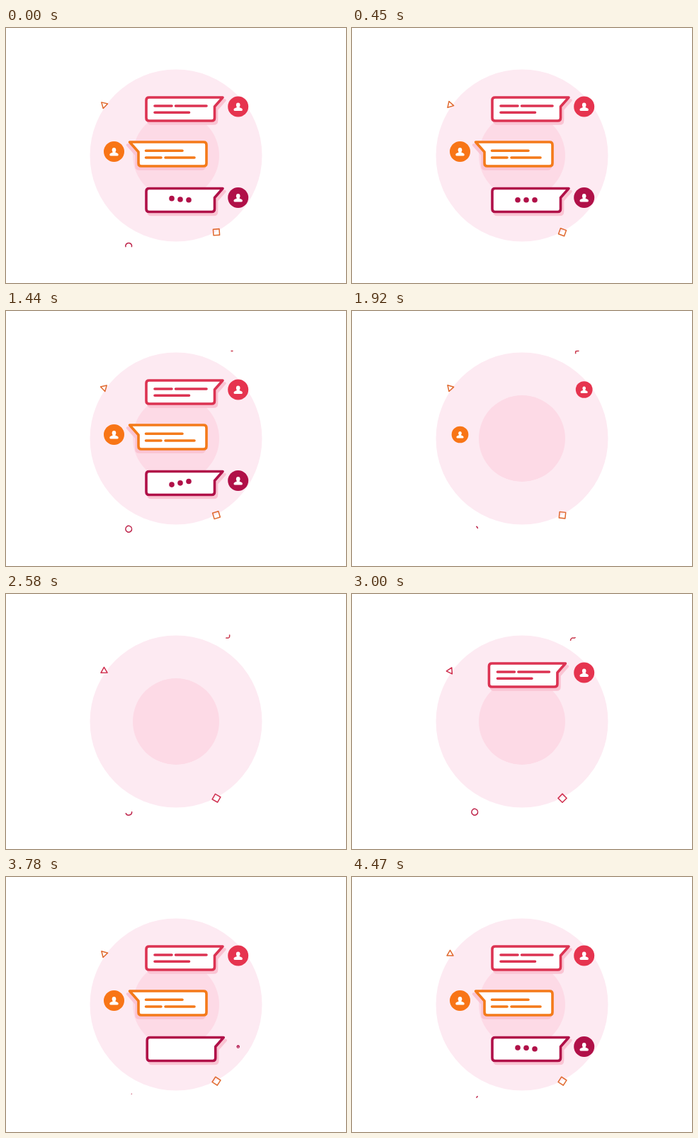
Animation of 480x360 px, one loop 4.5 s. Source, as an HTML page:

```html
<!DOCTYPE html>
<html lang="en">
<head>
<meta charset="utf-8">
<title>Chat bubbles</title>
<style>
  html, body { margin: 0; width: 100%; height: 100%; overflow: hidden; background: #fff; }
  svg { display: block; width: 100vw; height: 100vh; }
  .line { fill: none; stroke: currentColor; stroke-width: 3.6; stroke-linecap: round; stroke-linejoin: round; }
  .box { fill: #fff; }
  .shade { fill: #fac4d3; stroke: #fac4d3; }
  .bit { fill: none; stroke-width: 1.5; stroke-linejoin: round; }
</style>
</head>
<body>
<svg viewBox="0 0 480 360">
  <defs>
    <path id="right" d="M202 98H306L294.5 111V127q0 4-4 4H202q-4 0-4-4V102q0-4 4-4Z"/>
    <path id="left" d="M174.5 161H279q4 0 4 4V191q0 4-4 4H191q-4 0-4-4V175Z"/>
    <g id="person">
      <circle r="14.5" fill="currentColor"/>
      <ellipse cy="-2.3" rx="2.8" ry="3.2" fill="#fff"/>
      <path fill="#fff" d="M-6.2 4.6C-6.2 1.5-1.6 2-1.6 0H1.6C1.6 2 6.2 1.5 6.2 4.6Q6.2 6 5 6H-5Q-6.2 6-6.2 4.6Z"/>
    </g>
  </defs>

  <circle cx="240" cy="180" r="121.5" fill="#fdeaf2"/>
  <circle cx="240" cy="180" r="61" fill="#fddae6"/>

  <path id="tri" class="bit" d="M5.2 0L-2.6 4.5V-4.5Z"/>
  <rect id="square" class="bit" x="-4.3" y="-4.3" width="8.6" height="8.6"/>
  <path id="ring" class="bit" stroke="#bd2148"/>
  <path id="curl" class="bit" stroke="#c8354a" pathLength="100"
    d="M320.5 56.5C314 56 316 57.5 315.6 60C315 64 312 61 310 62.5Q308.5 63.6 308.5 66"/>

  <g color="#dc3352">
    <g class="bubble">
      <use href="#right" class="line shade" x="3" y="4"/>
      <use href="#right" class="line box"/>
      <path class="line" d="M210 110H234M239.5 110H283M210 119.3H258.5"/>
    </g>
    <use class="avatar" href="#person" color="#e6344f"/>
  </g>
  <g color="#f47a1a">
    <g class="bubble">
      <use href="#left" class="line shade" x="-3" y="4"/>
      <use href="#left" class="line box"/>
      <path class="line" d="M197.5 173.2H249M197.5 183H219M225 183H266"/>
    </g>
    <use class="avatar" href="#person" color="#f87516"/>
  </g>
  <g color="#b01048">
    <g class="bubble">
      <use href="#right" class="line shade" x="3" y="132.5"/>
      <use href="#right" class="line box" y="128.5"/>
      <g id="dots" fill="currentColor">
        <circle cx="234" r="3.8"/><circle cx="246" r="3.8"/><circle cx="258" r="3.8"/>
      </g>
    </g>
    <use class="avatar" href="#person"/>
  </g>
</svg>
<script>
const LOOP = 4500;
const $ = id => document.getElementById(id);
const bubbles = document.querySelectorAll('.bubble');
const avatars = document.querySelectorAll('.avatar');
const dots = $('dots');

// Slide-in start, direction, exit times and avatar position of each message.
const messages = [
  { enter: 2698, dir: 1, fade: 1740, shrink: 1840, x: 327.7, y: 111 },
  { enter: 3238, dir: -1, fade: 1740, shrink: 1840, x: 152.5, y: 174.5 },
  { enter: 3633, dir: 1, fade: 1640, shrink: 1700, x: 327.7, y: 239.5 }
];

// Rows of [time, value, value...]
const spin = [[0, -4], [930, 45], [1440, 73], [1920, 96], [3000, 135], [3780, 123], [4500, 123]];
const ringTrim = [[0, 160, 380], [450, 380, 380], [451, 30, 30], [930, 30, 150], [1440, 30, 389],
  [1441, -10, 349], [1920, 300, 350], [2050, 350, 350], [2200, -10, -10], [3000, -10, 349],
  [3780, 333, 345], [3850, 345, 345], [4250, 20, 20], [4500, 20, 65]];
const curlTrim = [[0, 0, 0], [1390, 0, 0], [1440, 0, 15], [1920, 0, 43], [3000, 46, 100],
  [3250, 100, 100], [4500, 100, 100]];

const part = (t, from, length) => Math.min(1, Math.max(0, (t - from) / length));
const outCubic = p => 1 - (1 - p) ** 3;
const outBack = p => 1 + 2.70158 * (p - 1) ** 3 + 1.70158 * (p - 1) ** 2;

function at(rows, t) {
  const i = Math.max(1, rows.findIndex(r => r[0] > t));
  const [a, b] = [rows[i - 1], rows[i]];
  const p = (t - a[0]) / (b[0] - a[0]);
  return a.slice(1).map((v, k) => v + (b[k + 1] - v) * p);
}

function place(el, x, y, angle = 0, scale = 1) {
  el.setAttribute('transform', `translate(${x} ${y}) rotate(${angle}) scale(${scale})`);
}

function show(el, visible) {
  el.style.display = visible ? '' : 'none';
}

function drawMessage(m, i, t) {
  const entering = t >= m.enter;
  const opacity = entering ? 1 : 1 - part(t, m.fade, 120);
  const shift = entering ? 62 * m.dir * (1 - outBack(part(t, m.enter, 420))) : 0;
  bubbles[i].setAttribute('opacity', opacity);
  place(bubbles[i], shift, 0);
  show(bubbles[i], opacity > 0);

  const pop = m.enter + 139;
  const scale = t >= pop ? outCubic(part(t, pop, 170)) : 1 - part(t, m.shrink, 190) ** 2;
  place(avatars[i], m.x, m.y, 0, scale);
  show(avatars[i], scale > 0.01);
}

function drawDots(t) {
  const wave = 360;
  const start = t > 3900 ? 4340 : t < 1170 ? -108 : 1170;
  [...dots.children].forEach((dot, i) => {
    const p = part(t, start + i * wave / 4, wave);
    dot.setAttribute('cy', 242.8 - 2.3 * Math.sin(2 * Math.PI * p));
  });
  dots.setAttribute('opacity', t < 2300 ? 1 : part(t, 3960, 120));
}

function drawBits(t) {
  const color = t > 2200 && t < 3230 ? '#cf2c4c' : '#e0692f';
  $('tri').setAttribute('stroke', color);
  $('square').setAttribute('stroke', color);
  place($('tri'), 138.5, 108.5, 104 + 0.064 * t);
  place($('square'), 297, 288.2, at(spin, t)[0]);

  const [a, b] = at(ringTrim, t);
  const point = deg => {
    const r = deg * Math.PI / 180;
    return `${173.2 + 4.4 * Math.cos(r)} ${307.8 + 4.4 * Math.sin(r)}`;
  };
  $('ring').setAttribute('d', `M${point(a)}A4.4 4.4 0 ${b - a > 180 ? 1 : 0} 1 ${point(b)}`);
  show($('ring'), b - a > 0.5);

  const [from, to] = at(curlTrim, t);
  $('curl').setAttribute('stroke-dasharray', `0 ${from} ${to - from} 200`);
  show($('curl'), to - from > 0.5);
}

function draw() {
  const t = performance.now() % LOOP;
  messages.forEach((m, i) => drawMessage(m, i, t));
  drawDots(t);
  drawBits(t);
  requestAnimationFrame(draw);
}
draw();
</script>
</body>
</html>
```
